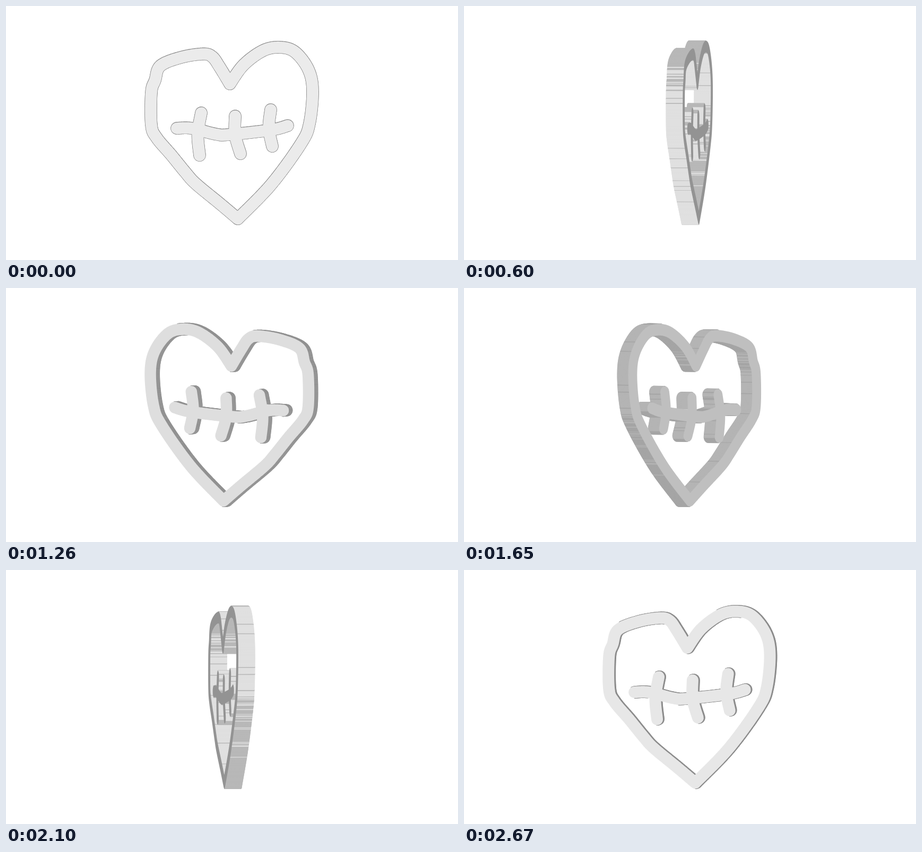
These frames come from a looping animation (852 by 480 pixels, 2.7 s). An HTML page with a canvas:

```html
<!DOCTYPE html>
<html lang="en">
<head>
<meta charset="utf-8">
<title>Stitched heart</title>
<style>
html, body { margin: 0; width: 100%; height: 100%; overflow: hidden; background: #fff; }
canvas { display: block; }
</style>
</head>
<body>
<canvas id="stage" width="852" height="480"></canvas>
<script>
const ctx = document.getElementById('stage').getContext('2d');
const LOOP = 2700, STEP = 30, CX = 425, HALF = 15.8, R = 11, EDGE = 1.4, TILT = 0.013;

// A crossbar bows a little to the left on its way down.
const crossbar = (x, y, lean, h) => [[x, y], [x + lean / 2 - 5, y + h / 2], [x + lean, y + h]];

// Pen strokes through a few key points: two heart halves, the seam, three crossbars.
const STROKES = [
  [[422, 147], [402, 114], [389, 96], [372, 90.5], [330, 97], [291, 113], [281, 140], [274, 163],
   [274, 225], [284, 249], [312, 282], [338, 314], [358, 336], [404, 374], [437, 402]],
  [[422, 147], [448, 111], [485, 84], [517, 78], [545, 87], [570, 120], [578, 160],
   [572, 222], [556, 260], [500, 337], [437, 402]],
  [[322, 231], [350, 231], [395, 242], [420, 243], [500, 234], [531, 226]],
  crossbar(368, 202, -3, 80),
  crossbar(432, 208, 10, 71),
  crossbar(499, 196, 3, 69)
];

// Catmull-Rom curve sampled at about 1.5 px, with x measured from the axis.
function sample(pts) {
  const out = [], last = pts.length - 1;
  for (let i = 0; i < last; i++) {
    const [a, b, c, d] = [-1, 0, 1, 2].map(k => pts[Math.max(0, Math.min(last, i + k))]);
    const n = Math.ceil(Math.hypot(c[0] - b[0], c[1] - b[1]) / 1.5);
    const at = (j, u) => b[j] + 0.5 * u * (c[j] - a[j] +
      u * (2 * a[j] - 5 * b[j] + 4 * c[j] - d[j] + u * (3 * (b[j] - c[j]) + d[j] - a[j])));
    for (let k = i ? 1 : 0; k <= n; k++) out.push([at(0, k / n) - CX, at(1, k / n)]);
  }
  return out;
}

const lines = STROKES.map(sample);
const centres = lines.flat();

const face = new Path2D();
for (const line of lines) line.forEach(([x, y], i) => i ? face.lineTo(x, y) : face.moveTo(x, y));

const isFree = (x, y) => centres.every(c => Math.hypot(c[0] - x, c[1] - y) > R - 0.25);

// Walks out and back along a line at distance R; keeps what lies on the outline of the union.
function outline(line) {
  const loop = [...line, ...line.slice(1, -1).reverse()], n = loop.length, ring = [];
  const heading = (a, b) => Math.atan2(b[1] - a[1], b[0] - a[0]);
  loop.forEach((p, i) => {
    const a = heading(loop[(i + n - 1) % n], p);
    let turn = heading(p, loop[(i + 1) % n]) - a;
    while (turn > Math.PI + 0.1) turn -= 2 * Math.PI;
    while (turn < -3) turn += 2 * Math.PI;
    const m = Math.ceil(Math.abs(turn) / 0.2) || 1;
    for (let k = m > 1 ? 0 : 1; k <= m; k++) {
      const ang = a + turn * k / m - Math.PI / 2;
      const x = p[0] + R * Math.cos(ang), y = p[1] + R * Math.sin(ang);
      ring.push({ x, y, ang, ok: isFree(x, y) });
    }
  });
  return ring;
}

// Walls are striped: slopes rising to the right are mostly dull, the others mostly bright.
const walls = [];
for (const ring of lines.map(outline)) {
  ring.forEach((a, i) => {
    const b = ring[(i + 1) % ring.length];
    if (!a.ok || !b.ok) return;
    const nx = Math.cos(b.ang), ny = Math.sin(b.ang), flat = Math.abs(ny);
    const noise = Math.abs(Math.sin(walls.length * 12.9898) * 43758.5453) % 1;
    const dull = flat > 0.97 || noise < (nx * ny > 0 ? 1.4 * flat : 0.04);
    walls.push({ a, b, nx, ny, dull, mid: a.x + b.x });
  });
}
walls.sort((p, q) => p.mid - q.mid);

// Grey falls evenly with the angle between surface and viewer.
function grey(cos) {
  const g = Math.round(235 - 63 * Math.acos(Math.min(1, Math.abs(cos))));
  return `rgb(${g},${g},${g})`;
}

function draw(t) {
  const turn = t / LOOP * 2 * Math.PI, s = Math.sin(turn), c = Math.cos(turn);
  ctx.setTransform(1, 0, 0, 1, 0, 0);
  ctx.fillStyle = '#fff';
  ctx.fillRect(0, 0, 852, 480);

  const dx = HALF * s, dy = TILT * HALF * c;
  const bright = grey(s), dull = grey(s * 0.7);
  ctx.lineWidth = EDGE;
  ctx.lineJoin = 'round';
  for (const w of s > 0 ? [...walls].reverse() : walls) {
    if (w.nx * s + w.ny * TILT > 0.02) continue;
    const ax = CX + w.a.x * c, ay = w.a.y - TILT * w.a.x * s;
    const bx = CX + w.b.x * c, by = w.b.y - TILT * w.b.x * s;
    ctx.fillStyle = ctx.strokeStyle = w.dull ? dull : bright;
    ctx.beginPath();
    ctx.moveTo(ax - dx, ay - dy);
    ctx.lineTo(bx - dx, by - dy);
    ctx.lineTo(bx + dx, by + dy);
    ctx.lineTo(ax + dx, ay + dy);
    ctx.closePath();
    ctx.fill();
    ctx.stroke();
  }

  const side = c > 0 ? 1 : -1;
  ctx.setTransform(c, -TILT * s, 0, 1, CX + side * dx, side * dy);
  ctx.lineWidth = 2 * R;
  ctx.lineCap = 'round';
  ctx.strokeStyle = grey(c);
  ctx.stroke(face);
}

let start = null;
function tick(now) {
  if (start === null) start = now;
  draw(Math.floor((now - start) % LOOP / STEP) * STEP);
  requestAnimationFrame(tick);
}
draw(0);
requestAnimationFrame(tick);
</script>
</body>
</html>
```
